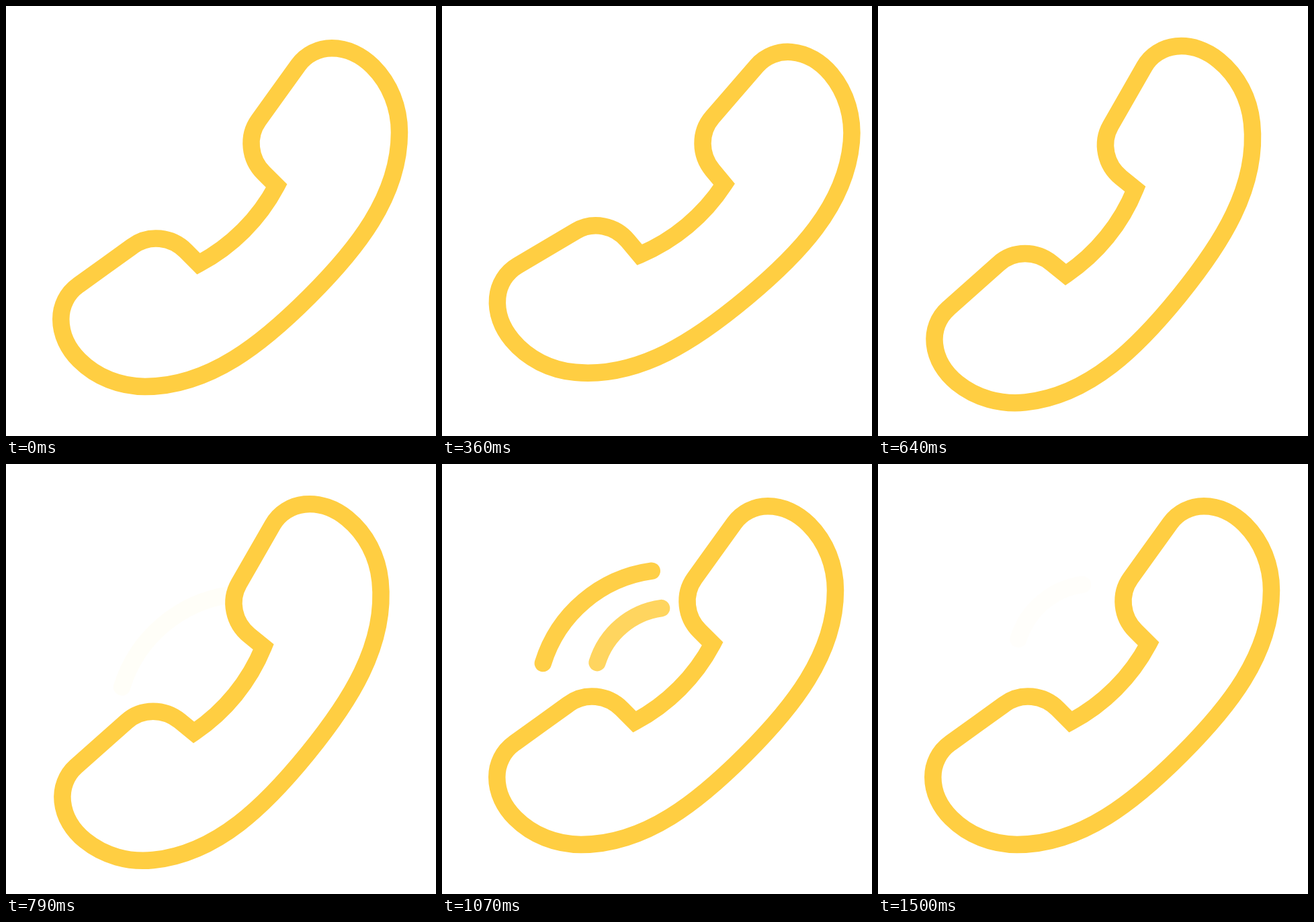
Animation, 640 px wide and 640 px high, one loop 2.43 s. Source, as an HTML page with a canvas:

```html
<!DOCTYPE html>
<html lang="en">
<head>
<meta charset="utf-8">
<title>Ringing phone</title>
<style>
  html, body { margin: 0; width: 100%; height: 100%; overflow: hidden; background: #fff; }
  canvas { display: block; width: 100vw; height: 100vh; object-fit: contain; }
</style>
</head>
<body>
<canvas id="stage" width="640" height="640"></canvas>
<script>
const ctx = document.getElementById('stage').getContext('2d');
const LOOP = 2430;
const LAST_STEP = 21;
const STEPS_PER_MS = 14 / 1000;
const RAD = Math.PI / 180;
const PIVOT = { x: 438, y: 460 };

const knot = (x, y, heading) => ({ x, y, heading });

// The handset is symmetric about the line y = x - 19; the mirrored knot is passed in reverse.
const mirror = k => knot(k.y + 19, k.x - 19, 270 - k.heading);

// Joins two knots with a cubic whose handles approximate a circular arc.
function arcTo(path, a, b) {
  const turn = Math.abs(b.heading - a.heading) * RAD;
  const ratio = turn ? (2 / 3) * Math.tan(turn / 4) / Math.sin(turn / 2) : 1 / 3;
  const reach = ratio * Math.hypot(b.x - a.x, b.y - a.y);
  const handle = (k, sign) => [
    k.x + sign * reach * Math.cos(k.heading * RAD),
    k.y + sign * reach * Math.sin(k.heading * RAD)
  ];
  path.bezierCurveTo(...handle(a, 1), ...handle(b, -1), b.x, b.y);
}

function buildHandset() {
  const back = knot(451.5, 432.5, -45);
  const earpiece = [
    knot(585.5, 188, -90),
    knot(546, 90, -135),
    knot(485, 62.75, -180),
    knot(435, 88, -234.25),
    knot(376, 170, -234.25),
    knot(383.5, 248.5, -315),
    knot(402.7, 267.7, -315)
  ];
  const mouthpiece = earpiece.map(mirror).reverse();
  // Mirrored headings are a full turn apart from the ones they continue into.
  mouthpiece.forEach(k => { k.heading -= 360; });

  const shell = [...mouthpiece, knot(back.x, back.y, back.heading), ...earpiece];
  const corner = earpiece[earpiece.length - 1];
  const gripStart = knot(corner.x, corner.y, 118);

  const path = new Path2D();
  path.moveTo(shell[0].x, shell[0].y);
  for (let i = 1; i < shell.length; i++) arcTo(path, shell[i - 1], shell[i]);
  arcTo(path, gripStart, mirror(gripStart));
  path.closePath();
  return path;
}

const handset = buildHandset();
const ease = p => (1 - Math.cos(Math.PI * p)) / 2;

// Swing angle in degrees: out one way, over to the other side, back to rest.
function swingAt(step) {
  const blend = (from, to, start, end) => from + (to - from) * ease((step - start) / (end - start));
  if (step < 4.8) return blend(0, 5.2, 0, 4.8);
  if (step < 9.8) return blend(5.2, -6.7, 4.8, 9.8);
  if (step < 15) return blend(-6.7, 0, 9.8, 15);
  return 0;
}

function drawHandset(step) {
  ctx.save();
  ctx.translate(PIVOT.x, PIVOT.y);
  ctx.rotate(swingAt(step) * RAD);
  ctx.translate(-PIVOT.x, -PIVOT.y);
  ctx.stroke(handset);
  ctx.restore();
}

// An arc that drifts up and left while it fades in and out.
function drawWave(step, start, x, y, size) {
  const p = (step - start) / 10.25;
  if (p <= 0 || p >= 1) return;
  const moved = ease(p) * size;
  ctx.globalAlpha = ease(1 - Math.abs(2 * p - 1));
  ctx.beginPath();
  ctx.arc(x - 54 * moved, y - 86 * moved, 197.5 * size, -162.8 * RAD, -97.8 * RAD);
  ctx.stroke();
  ctx.globalAlpha = 1;
}

// The picture advances 14 times a second, on 10 ms ticks.
function stepAt(ms) {
  const tick = Math.floor(ms / 10) * 10;
  return Math.min(LAST_STEP, Math.floor((tick + 5) * STEPS_PER_MS));
}

function draw(ms) {
  const step = stepAt(ms % LOOP);
  ctx.fillStyle = '#fff';
  ctx.fillRect(0, 0, 640, 640);
  ctx.strokeStyle = '#ffce42';
  ctx.lineWidth = 25.5;
  ctx.lineCap = 'round';
  drawWave(step, 10.4, 361.7, 391, 1);
  drawWave(step, 11.2, 352, 345.4, 0.59);
  drawHandset(step);
}

const begin = performance.now();
function tick() {
  draw(performance.now() - begin);
  requestAnimationFrame(tick);
}
tick();
</script>
</body>
</html>
```
